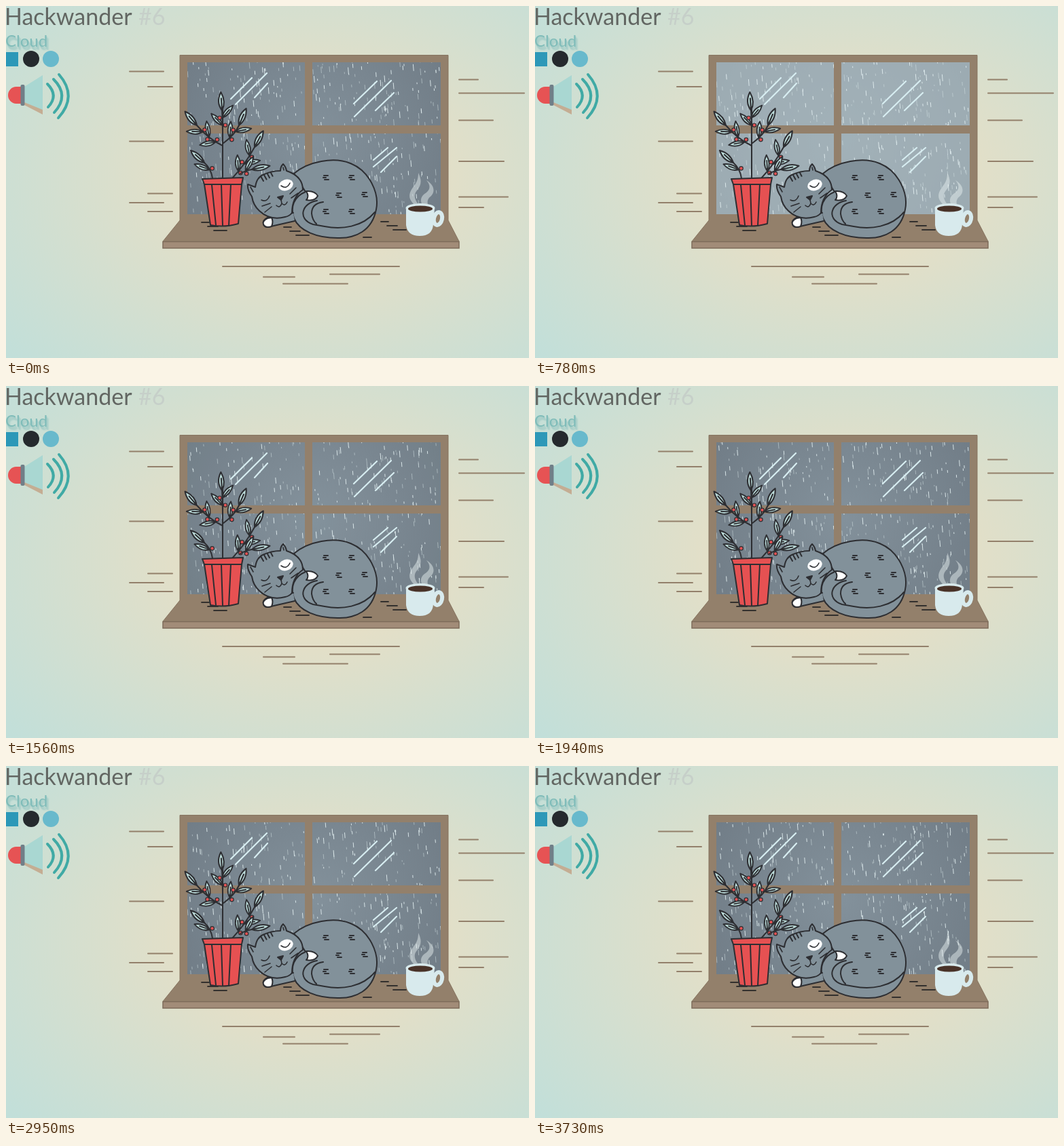
Recreate the animation shown at these times as an HTML page. Size 770 px wide and 519 px high, loop 3810 ms.

```html
<!DOCTYPE html>
<html lang="en">
<head>
<meta charset="utf-8">
<title>Cat at a rainy window</title>
<style>
html, body { margin: 0; width: 100%; height: 100%; overflow: hidden; }
svg { display: block; width: 770px; height: 519px; }
text { font-family: Lato, "Open Sans", sans-serif; }
.ink { stroke: #2d2e32; stroke-width: 2; stroke-linecap: round; stroke-linejoin: round; }
.line { fill: none; }
.subtitle { font-size: 24px; fill: #7fbcb9; text-shadow: 1px 2px 1px #a5cdc8, 2px 4px 1px #a9cfc9, 3px 5px 2px #a9cfc9; }
</style>
</head>
<body>
<svg viewBox="0 0 770 519">
  <defs>
    <radialGradient id="wall" gradientUnits="userSpaceOnUse" r="1" gradientTransform="translate(449 252) scale(600 420)" cx="0" cy="0">
      <stop stop-color="#f3dfbf"/><stop offset="1" stop-color="#c0dfda"/>
    </radialGradient>
    <radialGradient id="sky" gradientUnits="userSpaceOnUse" cx="453" cy="195" r="220">
      <stop stop-color="#83919b"/><stop offset="1" stop-color="#717d87"/>
    </radialGradient>
    <clipPath id="opening"><path d="M267 83H640V307H267Z"/></clipPath>
  </defs>
  <rect width="770" height="519" fill="url(#wall)"/>

  <!-- heading -->
  <text x="-2" y="28" font-size="34" fill="#626662">Hackwander</text>
  <text x="195" y="28" font-size="34" fill="#c6cfc9">#6</text>
  <text x="-1" y="60" class="subtitle">Cloud</text>
  <rect x="-4" y="68" width="22" height="21" fill="#2d98b8"/>
  <circle cx="37" cy="78" r="12" fill="#252a2e"/>
  <circle cx="66" cy="78" r="12" fill="#68b9cc"/>

  <!-- loudspeaker -->
  <path fill="#e65354" d="M22 119H15A12 12.5 0 0 0 15 144H22Z"/>
  <path fill="#a9d7d2" d="M27 119L54 102V154L27 142Z"/>
  <path fill="#c4ad93" d="M27 142L54 153V160L27 146Z"/>
  <rect x="21.500" y="116" width="6" height="31" rx="2" fill="#707f88"/>
  <path class="line" stroke="#40aaa5" stroke-width="4" stroke-linecap="round" d="M61 115Q78 132 62 149M70 108Q94 132 71 157M78 101Q106 133 77 165"/>

  <path id="wallLines" class="line" stroke="#93806b" stroke-width="2" stroke-linecap="round"/>

  <!-- window -->
  <g clip-path="url(#opening)">
    <rect x="267" y="83" width="373" height="224" fill="url(#sky)"/>
    <rect id="flash" x="267" y="83" width="373" height="224" fill="#b1c1c6"/>
    <path id="faintRain" class="line" stroke="#d5e3e6" stroke-opacity=".5"/>
    <path id="brightRain" class="line" stroke="#e2eef0" stroke-opacity=".9"/>
  </g>
  <path class="line" stroke="#d7edf1" stroke-width="2.200" stroke-linecap="round" d="M331 137L362 106M338 145L384 99M366 135L385 114M512 144L546 111M513 163L567 110M544 154L571 128M541 227L562 209M541 237L575 209M552 245L575 222"/>
  <path fill="#93806b" fill-rule="evenodd" d="M256 72H651V316L667 347H231L256 316ZM267 83V176H440V83ZM451 83V176H640V83ZM267 188V307H440V188ZM451 188V307H640V188Z"/>
  <path class="line" stroke="#85735f" d="M231 347L256 316V72.500H651V316L667 347"/>
  <path fill="#a28c78" stroke="#7d6b5a" stroke-width="1.500" d="M231 347.500H667V357H231Z"/>
  <path id="sillLines" class="line" stroke="#33302e" stroke-width="1.800" stroke-linecap="round"/>

  <!-- plant -->
  <path class="ink line" d="M319 255V153"/>
  <g id="plant" class="ink"></g>
  <g class="ink" fill="#e65152">
    <path d="M292 263L301 323Q321 327 342 321L347 263Z"/>
    <path d="M289 255L349 253L347 263L292 263Z"/>
    <path class="line" d="M303 264L309 323M317 264L319 324M331 263L328 324"/>
  </g>

  <!-- cat -->
  <g class="ink" fill="#82919a">
    <path d="M424 247C445 229 483 222 507 232C535 243 550 276 545 300C539 331 515 343 488 342C458 342 432 332 424 313C418 296 424 281 441 274Z"/>
    <path d="M423 305L385 312Q377 316 379 322Q381 328 390 325L425 317"/>
    <path fill="#fff" d="M391 312L385 313Q377 317 379 322Q382 328 391 325Q394 318 391 312Z"/>
    <path d="M362 281Q355 271 356 263L367 267Q369 253 378 249Q391 243 404 243Q404 237 408 233Q412 237 413 243Q437 251 437 271Q421 282 421 305Q417 310 411 311Q389 317 373 302Q364 294 362 281Z"/>
    <path class="line" d="M458 287C436 290 428 314 452 322L469 325C494 330 525 326 543 304M467 289Q450 291 450 306Q451 316 457 321"/>
    <path fill="#fff" d="M442 273Q455 272 459 280Q455 288 442 286Q447 281 442 273Z"/>
    <ellipse cx="412" cy="264" rx="11" ry="8" fill="#fff" stroke="none" transform="rotate(-20 412 264)"/>
    <path fill="#2d2e32" d="M400 282L408 280L405 286Z"/>
    <path class="line" stroke-width="1.600" d="M405 265Q413 271 418 261M376 286Q384 290 388 280M405 286L406 291Q403 299 398 294M406 291Q411 296 414 289M377 295L389 291M381 304L391 296M418 277L427 268M420 283L430 276M360 267L364 274M408 238L409 242"/>
    <path id="furMarks" class="line"/>
  </g>

  <!-- mug -->
  <ellipse cx="636" cy="313.500" rx="6" ry="9.500" class="line" stroke="#d8eaed" stroke-width="6" transform="rotate(12 636 313.500)"/>
  <path fill="#d8eaed" d="M589 298V323Q591 339 609 339Q628 339 629 322L631 298Z"/>
  <ellipse cx="610" cy="298" rx="21.500" ry="7" fill="#d8eaed"/>
  <ellipse cx="610" cy="299" rx="18" ry="4.500" fill="#493329"/>
  <g fill="#e8f0f0" fill-opacity=".48">
    <path d="M607 246C613 258 611 265 605 272C600 278 601 284 606 291L600 292C592 284 593 277 598 269C603 262 607 258 607 246Z"/>
    <path d="M619 257C631 264 632 274 626 280C621 284 620 287 621 292L612 292C609 283 613 279 619 275C625 270 625 264 619 257Z"/>
  </g>
</svg>
<script>
const LOOP = 3810, STEP = LOOP / 48;
const byId = id => document.getElementById(id);
const setPath = (id, d) => byId(id).setAttribute("d", d);
const dash = (x, y, length) => `M${x} ${y}h${length}`;
const repeat = (count, make) => Array.from({ length: count }, (_, i) => make(i)).join("");

let seed = 47;
const random = () => (seed = seed * 16807 % 2147483647) / 2147483647;

// Short and long strokes alternate down both sides of the window
const leftLine = (y, i) => i % 2 ? dash(209, y, 36) : dash(182, y, 50);
const rightLine = (y, i) => dash(667, y, i % 2 ? 111 - 15 * i : 28 + 11 * i);
setPath("wallLines",
  [96.5, 119, 199.5, 276.5, 290, 303].map(leftLine).join("") +
  [108.5, 128.5, 168.5, 229, 281.5, 297].map(rightLine).join("") +
  dash(319, 384, 260) + dash(477, 395.5, 73) + dash(379, 399.5, 46) + dash(408, 409.5, 95));

const shadow = (x, y) => repeat(3, i => dash(x + 9 * i, y + 6 * i, 11 + 4 * i));
setPath("sillLines", shadow(288, 319) + shadow(409, 326) + shadow(552, 318) + dash(526, 341, 12));

// One spot in the middle of the back, the rest around it
const spot = (x, y) => dash(x - 3, y - 3, 6) + dash(x - 4, y, 4) + dash(x - 2, y + 3, 6);
const ringSpot = i => {
  const angle = (i - 2) * Math.PI / 3;
  return spot(490 + 38 * Math.cos(angle), 278 + 29 * Math.sin(angle));
};
const foreheadStripe = i => `M${375 + 5 * i} ${251 - 1.7 * i}l${4 - .5 * i} ${7 - .7 * i}`;
setPath("furMarks", spot(490, 279) + repeat(5, ringSpot) + repeat(4, foreheadStripe));

function leaf(x, y, angle, length) {
  return `<path fill="#bcdcda" transform="translate(${x} ${y}) rotate(${angle * 180 / Math.PI}) scale(${length / 26})"
    d="M0 0Q12 -8 26 0Q12 7 0 0L17 0"/>`;
}

// A curved twig with leaves on alternate sides, a berry at each joint and a leaf at its end
function twig(x0, y0, x1, y1, x2, y2) {
  const mix = (a, b, c, t) => a * (1 - t) ** 2 + 2 * b * t * (1 - t) + c * t * t;
  const angleAt = t => Math.atan2((y1 - y0) * (1 - t) + (y2 - y1) * t, (x1 - x0) * (1 - t) + (x2 - x1) * t);
  const count = Math.round(Math.hypot(x2 - x0, y2 - y0) / 18);
  const joint = i => {
    const t = (i + 1) / (count + 1), side = i % 2 ? 1 : -1;
    const x = mix(x0, x1, x2, t), y = mix(y0, y1, y2, t), angle = angleAt(t);
    return leaf(x, y, angle + side * .75, 24) +
      `<circle cx="${x - side * 4 * Math.sin(-angle)}" cy="${y - side * 4 * Math.cos(angle)}" r="2.700" fill="#e65354" stroke-width="1.200"/>`;
  };
  return `<path class="line" d="M${x0} ${y0}Q${x1} ${y1} ${x2} ${y2}"/>` +
    repeat(count, joint) + leaf(x2, y2, angleAt(1), 27);
}
byId("plant").innerHTML =
  twig(319, 187, 319, 170, 318, 154) +
  twig(319, 206, 298, 196, 281, 176) + twig(319, 203, 337, 190, 343, 176) +
  twig(304, 254, 302, 240, 292, 231) + twig(333, 254, 352, 234, 366, 208) +
  twig(345, 247, 352, 243, 362, 241);

const drops = Array.from({ length: 480 }, () => ({
  x: 265 + random() * 377, phase: random(), length: 2 + random() * 8,
  laps: 7 + Math.floor(random() * 6), bright: random() < .5
}));

// Quick brightening, then a slow fade
function lightning(time) {
  const rise = (time - 40) / 300, fall = (1520 - time) / 1120;
  return Math.max(0, Math.min(1, rise, fall));
}

function rainPath(time, bright) {
  return drops.filter(drop => drop.bright === bright).map(drop => {
    const y = 72 + (drop.phase + drop.laps * time / LOOP) % 1 * 240;
    return `M${drop.x.toFixed(1)} ${y.toFixed(1)}l${(drop.length * .08).toFixed(1)} ${drop.length.toFixed(1)}`;
  }).join("");
}

let shown = -1;
function draw() {
  const time = Math.floor(performance.now() % LOOP / STEP) * STEP;
  if (time !== shown) {
    shown = time;
    byId("flash").setAttribute("opacity", lightning(time) * .95);
    setPath("faintRain", rainPath(time, false));
    setPath("brightRain", rainPath(time, true));
  }
  requestAnimationFrame(draw);
}
draw();
</script>
</body>
</html>
```
